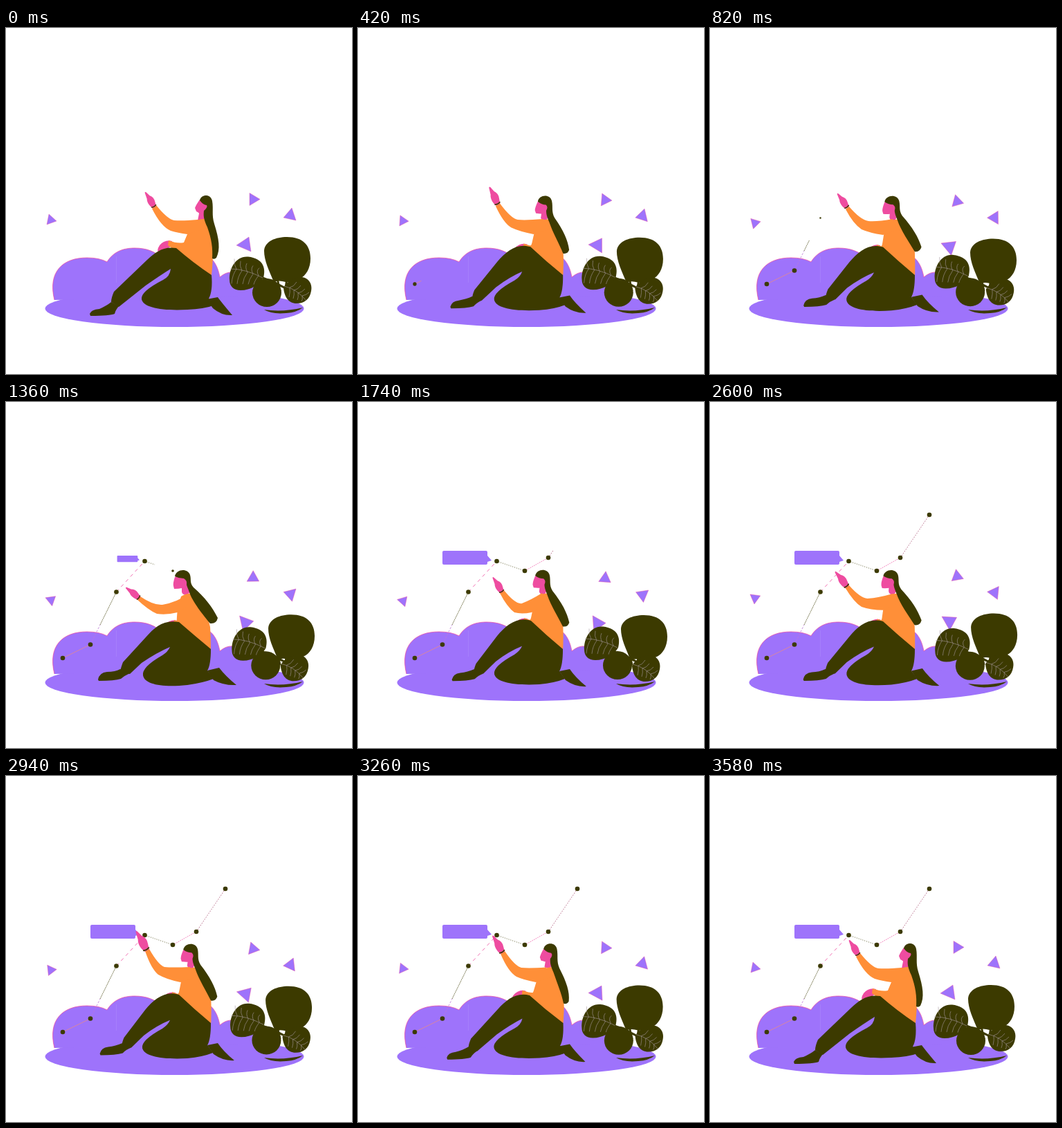
An HTML page with a canvas that plays this animation: 500 px wide and 500 px high, repeating every 3600 ms.

```html
<!DOCTYPE html>
<html lang="en">
<head>
<meta charset="utf-8">
<title>Pointing at the chart</title>
<style>
html, body { margin: 0; width: 100%; height: 100%; overflow: hidden; background: #fff; }
canvas { display: block; }
</style>
</head>
<body>
<canvas id="stage" width="500" height="500"></canvas>
<script>
const ctx = document.getElementById('stage').getContext('2d');
const LOOP = 3600;
const PURPLE = '#9e73fb', DARK = '#3c3a00', ORANGE = '#ff8f38', PINK = '#ee4ca0', SALMON = '#e88a8a', VEIN = '#a598a0';

const clamp = v => Math.max(0, Math.min(1, v));
const smooth = v => { v = clamp(v); return v * v * (3 - 2 * v); };
const lerp = (a, b, k) => a + (b - a) * k;
const NUMBER = /-?\d+(\.\d+)?/g;

// Blends two paths that share the same commands.
function morph(a, b, k) {
  const ends = b.match(NUMBER);
  let i = 0;
  return a.replace(NUMBER, v => lerp(+v, +ends[i++], k).toFixed(2));
}
function fill(path, color) {
  ctx.fillStyle = color;
  ctx.fill(new Path2D(path));
}
function line(path, color, width = 1, dash = []) {
  ctx.strokeStyle = color;
  ctx.lineWidth = width;
  ctx.setLineDash(dash);
  ctx.stroke(new Path2D(path));
  ctx.setLineDash([]);
}
function oval(x, y, rx, ry, color) {
  ctx.beginPath();
  ctx.ellipse(x, y, rx, ry, 0, 0, 7);
  ctx.fillStyle = color;
  ctx.fill();
}
function at(x, y, draw) {
  ctx.save();
  ctx.translate(x, y);
  draw();
  ctx.restore();
}

// Each pair holds the upright and the leaning shape.
const body = {
  torso: ['M275 278 Q285 275 293 276 Q299 298 299 320 Q299 340 297 357 Q270 342 238 318 Q256 316 257 311 L263 296 Z',
          'M253 281 Q262 276 268 277 Q290 300 295 325 Q296 340 296 357 Q268 342 246 320 Q247 315 247 310 L248 297 Z'],
  face: ['M280 248 Q275 255 273 260 L275 265 Q279 267 279 268 L277 278 Q283 279 288 275 L292 255 Q288 248 280 248 Z',
         'M244 253 Q241 262 242 266 Q243 270 250 270 Q254 269 254 272 L253 279 Q261 279 266 275 L262 254 Q252 250 244 253 Z'],
  hair: ['M280 249 C282 240 296 239 298 250 C300 262 297 270 301 283 C308 305 310 320 304 332 Q301 335 298 333 C299 318 297 305 291 288 C286 277 285 272 286 264 Q292 259 290 256 Q285 256 280 249 Z',
         'M244 252 C246 241 263 240 266 250 C268 257 265 261 271 268 C288 283 298 296 306 312 Q304 321 295 320 C285 308 269 288 265 275 C263 269 262 268 261 264 Q262 258 257 255 Q250 255 244 252 Z']
};
// Upright, halfway and fully leaning.
const legs = {
  limbs: ['M297 357 Q270 339 246 318 C227 315 216 324 204 335 L156 381 Q152 390 152 396 L163 403 L202 372 Q222 358 238 348 Q237 359 227 364 Q194 381 196 392 C198 404 226 409 262 407 Q286 406 300 401 L293 391 Q299 380 297 357 Z',
          'M296 357 Q272 337 250 316 C231 309 214 322 201 338 L171 378 Q168 385 168 389 L182 392 L199 375 Q219 360 237 353 Q234 360 226 365 Q195 382 197 393 C199 405 226 410 262 408 Q284 406 299 400 L291 389 Q296 380 296 357 Z',
          'M296 357 Q273 338 250 318 C228 314 215 325 202 340 L169 376 Q166 384 165 389 L179 393 L196 377 Q218 362 237 354 Q234 361 226 366 Q196 383 198 395 C200 408 226 413 262 409 Q284 406 300 400 L291 388 Q296 380 296 357 Z'],
  shoe: ['M121 413 Q123 407 135 406 Q146 401 152 396 L163 402 Q158 408 157 413 Q150 416 122 416 Z',
         'M136 401 Q138 392 148 391 Q159 390 168 386 L182 392 Q174 395 169 400 Q159 403 137 403 Z',
         'M133 401 Q135 391 146 390 Q158 390 165 386 L179 392 Q172 395 166 400 Q157 403 134 403 Z'],
  backFoot: ['M290 392 L306 389 Q311 396 327 415 Q312 416 299 405 Z',
             'M291 389 L306 386 Q314 398 330 411 Q314 412 300 402 Z',
             'M291 388 L308 384 Q317 396 333 409 Q315 410 300 402 Z']
};

const arms = {
  rest: { lean: 0, hand: [214, 258, 201, 237],
    sleeve: 'M211 261 Q224 287 238 293 Q248 296 262 298 L288 290 L277 277 Q255 279 243 278 Q233 276 217 256 Z' },
  rise: { lean: .6, hand: [201, 254, 189, 229],
    sleeve: 'M198 257 Q209 281 220 288 Q232 294 253 298 L273 292 L267 276 Q242 278 230 277 Q220 275 204 253 Z' },
  point: { lean: .77, hand: [198, 259, 184, 239],
    sleeve: 'M196 262 Q207 283 219 291 Q230 296 250 299 L270 292 L264 276 Q242 280 229 279 Q217 277 201 258 Z' },
  low: { lean: 1, hand: [192, 283, 173, 268],
    sleeve: 'M189 285 Q206 301 218 306 Q232 308 248 304 L268 292 L262 278 Q248 289 226 293 Q213 294 194 281 Z' },
  bent: { lean: .66, hand: [208, 274, 195, 253],
    sleeve: 'M205 276 Q216 297 226 304 Q236 307 251 304 L272 292 L266 276 Q250 286 237 291 Q228 293 211 272 Z' },
  high: { lean: .66, hand: [203, 251, 188, 224],
    sleeve: 'M201 253 Q210 279 220 287 Q232 294 252 298 L272 292 L266 276 Q240 277 229 276 Q220 273 207 250 Z' }
};
const timeline = [[0, 'rest'], [500, 'rise'], [820, 'point'], [1360, 'low'], [1760, 'bent'],
                  [2240, 'low'], [2940, 'high'], [3580, 'rest'], [LOOP, 'rest']];

function poseAt(t) {
  const i = timeline.findIndex(key => key[0] > t);
  const [t0, n0] = timeline[i - 1], [t1, n1] = timeline[i];
  const a = arms[n0], b = arms[n1], k = smooth((t - t0) / (t1 - t0));
  return {
    lean: lerp(a.lean, b.lean, k),
    hand: a.hand.map((v, j) => lerp(v, b.hand[j], k)),
    sleeve: morph(a.sleeve, b.sleeve, k)
  };
}

function drawWoman(t) {
  const { lean, hand, sleeve } = poseAt(t);
  const part = ([a, b], color) => fill(morph(a, b, lean), color);
  const leg = ([a, b, c]) => {
    const half = .68;
    fill(lean < half ? morph(a, b, lean / half) : morph(b, c, (lean - half) / (1 - half)), DARK);
  };

  at(8 * lean, 8 * lean, () => {
    fill('M219 322 Q220 313 228 309 Q234 306 240 308 L239 315 L232 320 L224 326 Z', PINK);
    fill('M235 307 Q248 312 257 310 L263 296 L270 315 L245 322 L234 314 Z', ORANGE);
  });
  part(body.face, PINK);
  part(body.torso, ORANGE);
  leg(legs.backFoot);
  leg(legs.limbs);
  leg(legs.shoe);
  fill(sleeve, ORANGE);
  part(body.hair, DARK);

  const [x, y, tipX, tipY] = hand;
  at(x, y, () => {
    ctx.rotate(Math.atan2(tipY - y, tipX - x));
    const s = Math.hypot(tipX - x, tipY - y) / 25;
    ctx.scale(s, s);
    fill('M-1 -3 C6 -6 12 -5 15 -3 L24 -1 Q26 0 24 1 L17 3 Q12 7 6 5 L-1 3 Z', PINK);
    line('M1 -4 Q-1 0 1 4', DARK, 1.5);
  });
}

function drawGround() {
  oval(243.5, 405.5, 187, 26.5, PURPLE);
  const top = 'M70 393 C60 352 82 332 117 332 Q135 332 146 338 C156 322 171 318 186 318 C203 318 216 323 226 333 L280 325 C298 328 306 343 309 360 Q318 352 328 353 C346 354 361 366 364 388';
  fill(top + ' Z', PURPLE);
  ctx.globalAlpha = .75;
  line(top, PINK, 1);
  ctx.globalAlpha = .15;
  line('M159.5 330 V368', '#d8c8ff', 1);
  ctx.globalAlpha = 1;
}

// x, y, drop, turn in degrees, then corners around the centre
const triangles = [
  [65, 277, 10, -59, 'M-3 -8 L8 2 L-6 7 Z'],
  [357, 247.5, 7.5, 35, 'M-5 -9 L10 0 L-5 9 Z'],
  [411, 271, 8, 41, 'M2 -11 L8 7 L-10 3 Z'],
  [346, 313, 7, 63, 'M5 -11 L8 10 L-13 1 Z']
];

function drawTriangles(sway) {
  for (const [x, y, drop, turn, path] of triangles)
    at(x, y + drop * sway, () => {
      ctx.rotate(turn * sway * Math.PI / 180);
      fill(path, PURPLE);
      line(path, PINK, .4);
    });
}

function drawPlant(sway) {
  fill('M373 407 Q400 411 429 404 Q420 411 405 412 Q384 414 373 407 Z', DARK);
  line('M368 360 Q385 366 406 377 M392 362 L396 380 M406 362 L404 376', DARK, 3);
  at(7 * sway, 6 * sway, () =>
    fill('M387 367 C380 350 373 336 373 322 C374 308 390 302 406 302 C429 302 440 314 440 333 C440 348 433 358 425 362 Q412 368 404 367 Q394 364 387 367 Z', DARK));
  oval(377 - 2 * sway, 382.5 - 2 * sway, 21, 20.5, DARK);
  at(4 * sway, -6 * sway, () => {
    fill('M372 361 C376 346 371 333 350 330.5 C332 329 322 348 323 364 C323 373 329 379 339 379 C354 379 366 371 372 361 Z', DARK);
    let veins = 'M324 348 Q346 348 371 361';
    for (let i = 0; i < 5; i++) {
      const x = 333 + i * 8, y = 348.5 + i * 2.3;
      veins += `M${x} ${y} Q${x - 4} ${y - 7} ${x - 3 + i} ${y - 15 + i}`;
      veins += `M${x} ${y} Q${x - 6} ${y + 8} ${x - 7} ${y + 21 - i * 2}`;
    }
    line(veins, VEIN, .6);
  });
  at(-5 * sway, 6 * sway, () => {
    fill('M401 375 C406 366 417 360 427 360 C439 361 443 372 441 380 C439 392 431 398 420 398 C408 398 402 388 401 375 Z', DARK);
    let veins = 'M402 373 Q420 377 434 394';
    for (let i = 0; i < 4; i++) {
      const x = 410 + i * 6, y = 375 + i * 4;
      veins += `M${x} ${y} Q${x + 6} ${y - 1} ${x + 10} ${y - 8 + i}`;
      veins += `M${x} ${y} Q${x + 1} ${y + 6} ${x - 1} ${y + 14 - i * 2}`;
    }
    line(veins, VEIN, .6);
  });
}

// x, y, and the moment the dot pops up
const dots = [[82, 370, 300], [122, 350.5, 520], [159.5, 274.5, 750], [200.5, 230, 1070],
              [241, 244, 1270], [275, 225, 1540], [317, 163, 2140]];
const strokes = [
  [82, 370, 122, 350.5, SALMON, []],
  [122, 350.5, 136, 322, '#bd78d8', [3, 2]],
  [136, 322, 159.5, 274.5, DARK, [1.5, 1]],
  [159.5, 274.5, 200.5, 230, PINK, [5, 5]],
  [200.5, 230, 241, 244, DARK, [1, 2]],
  [241, 244, 275, 225, PINK, [1.5, 1.5]],
  [275, 225, 317, 163, '#a03c62', [1.5, 2]]
];

function drawChart(t) {
  let left = (t - 370) * .207;
  for (const [x0, y0, x1, y1, color, dash] of strokes) {
    if (left <= 0) break;
    const length = Math.hypot(x1 - x0, y1 - y0), k = clamp(left / length);
    line(`M${x0} ${y0} L${lerp(x0, x1, k)} ${lerp(y0, y1, k)}`, color, .8, dash);
    left -= length;
  }
  for (const [x, y, start] of dots) {
    const k = smooth((t - start) / 170);
    if (k > 0) oval(x, y, 3.3 * k, 3.3 * k, DARK);
  }
  const size = smooth((t - 1215) / 310);
  if (size > 0) at(193, 228, () => {
    ctx.scale(size, size);
    fill('M-69 -13 H-8 Q-6 -13 -6 -11 V-6 L0 1 L-6 3 V5 Q-6 7 -8 7 H-69 Q-71 7 -71 5 V-11 Q-71 -13 -69 -13 Z', PURPLE);
  });
}

function render(now) {
  const t = now % LOOP;
  const sway = (1 - Math.cos(t / LOOP * Math.PI * 2)) / 2;
  ctx.fillStyle = '#fff';
  ctx.fillRect(0, 0, 500, 500);
  drawGround();
  drawTriangles(sway);
  drawPlant(sway);
  drawChart(t);
  drawWoman(t);
}

const start = performance.now();
function tick() {
  render(performance.now() - start);
  requestAnimationFrame(tick);
}
tick();
</script>
</body>
</html>
```
